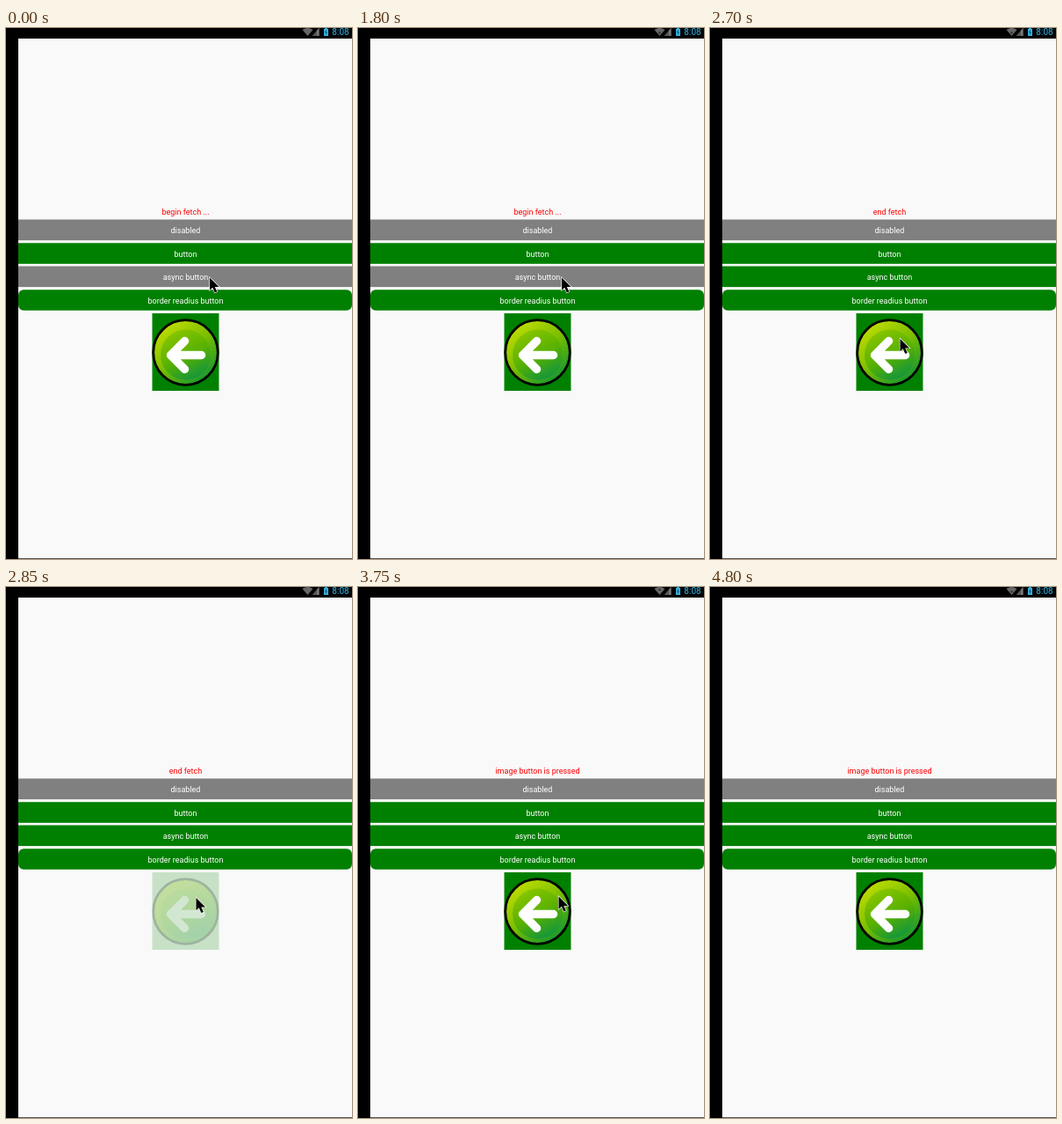
These frames come from a looping animation (394 by 603 pixels, 5550 ms). An HTML page:

```html
<!DOCTYPE html>
<html lang="en">
<head>
<meta charset="utf-8">
<title>Button states</title>
<style>
  html, body { margin: 0; width: 100%; height: 100%; overflow: hidden; background: #000; }
  svg { display: block; width: 394px; height: 603px; }
  text { font: 9px Roboto, sans-serif; fill: #fff; text-anchor: middle; }
  #status { fill: #f00; }
  #clock { font-size: 10px; fill: #33b5e5; }
</style>
</head>
<body>
<svg viewBox="0 0 394 603">
  <defs>
    <linearGradient id="rim" x1=".15" y1=".1" x2=".8" y2=".95">
      <stop offset="0" stop-color="#bfdc00"/>
      <stop offset=".5" stop-color="#78be00"/>
      <stop offset="1" stop-color="#149632"/>
    </linearGradient>
    <linearGradient id="face" x1=".2" y1="0" x2=".7" y2="1">
      <stop offset="0" stop-color="#8cc800"/>
      <stop offset=".55" stop-color="#58b000"/>
      <stop offset="1" stop-color="#109440"/>
    </linearGradient>
  </defs>

  <rect x="14" y="12" width="380" height="590" fill="#f9f9f9"/>
  <path d="M14 602.5H394" stroke="#555"/>

  <!-- status bar -->
  <path d="M337.5 2Q343.500 -2 349.500 2L343.500 9Z" fill="#666"/>
  <path id="up" d="M342 4L343.500 1.500L345 4Z" fill="#222"/>
  <path id="down" d="M342 4.500L343.500 7L345 4.500Z" fill="#222"/>
  <path d="M348.500 9L356.500 0V9Z" fill="#555"/>
  <path d="M354 3L356.500 0V9H354Z" fill="#777"/>
  <path d="M362 1H363.200V0H365.800V1H367V9H362Z" fill="#33b5e5"/>
  <path d="M365 2.500L363.500 5H365.500L364 7.500" fill="none" stroke="#124" stroke-width=".7"/>
  <text id="clock" x="381" y="8.300">8:08</text>

  <text id="status" x="204.500" y="212"></text>
  <g id="buttons"></g>

  <!-- image button -->
  <rect class="fade" x="166.500" y="324" width="76" height="88" fill="#008000"/>
  <g class="fade">
    <circle cx="204.500" cy="368.500" r="36.800" fill="url(#rim)" stroke="#000" stroke-width="2.800"/>
    <circle cx="204.500" cy="371" r="28.500" fill="url(#face)"/>
    <path d="M203.500 355.500L187.500 371.500L203.500 387.500M189 371.500H222.500"
      fill="none" stroke="#fff" stroke-width="9.500" stroke-linecap="round" stroke-linejoin="round"/>
  </g>

  <path id="cursor" d="M1 1V15.200L4.300 12.200L6.800 18L9.300 17L6.800 11.500H11.600Z"
    stroke="#fff" stroke-width="1.200" paint-order="stroke"/>
</svg>
<script>
const LOOP = 5550;
const GREEN = '#008000', GRAY = '#808080';
const $ = id => document.getElementById(id);
const show = (id, on) => $(id).setAttribute('visibility', on ? 'visible' : 'hidden');

// Each track lists [start time, value]; values hold until the next step.
const messages = [[0, 'begin fetch ...'], [2100, 'end fetch'], [3000, 'image button is pressed']];
const pointer = [
  [0, [231, 282.5]], [2550, [222, 346]], [2700, [215.5, 352]],
  [3750, [227.5, 350.5]], [3900, [234, 347]], [4050, [351, 533.5]], [4200, null]
];
const traffic = [[0, 0], [750, 3], [1800, 2], [2850, 0], [3750, 1], [4800, 2]];
const valueAt = (track, t) => track.findLast(([start]) => start <= t)[1];

$('buttons').innerHTML = [
  ['disabled', 217.5, GRAY, 0],
  ['button', 244.2, GREEN, 0],
  ['async button', 270.5, GREEN, 0],
  ['border readius button', 297.2, GREEN, 6]
].map(([label, y, color, radius]) =>
  `<rect x="14" y="${y}" width="380" height="23.6" rx="${radius}" fill="${color}"/>
   <text x="204.5" y="${Math.round(y + 15.4)}">${label}</text>`).join('');
const asyncButton = document.querySelectorAll('#buttons rect')[2];
const faders = document.querySelectorAll('.fade');

function draw(t) {
  $('status').textContent = valueAt(messages, t);
  asyncButton.setAttribute('fill', t < 2100 ? GRAY : GREEN);

  const pressed = t >= 2850 && t < 3000;
  faders.forEach(el => el.setAttribute('opacity', pressed ? 0.2 : 1));

  const position = valueAt(pointer, t);
  show('cursor', position);
  if (position) $('cursor').setAttribute('transform', `translate(${position})`);

  const activity = valueAt(traffic, t);
  show('up', activity & 1);
  show('down', activity & 2);
}

const begin = performance.now();
function tick() {
  draw((performance.now() - begin) % LOOP);
  requestAnimationFrame(tick);
}
tick();
</script>
</body>
</html>
```
